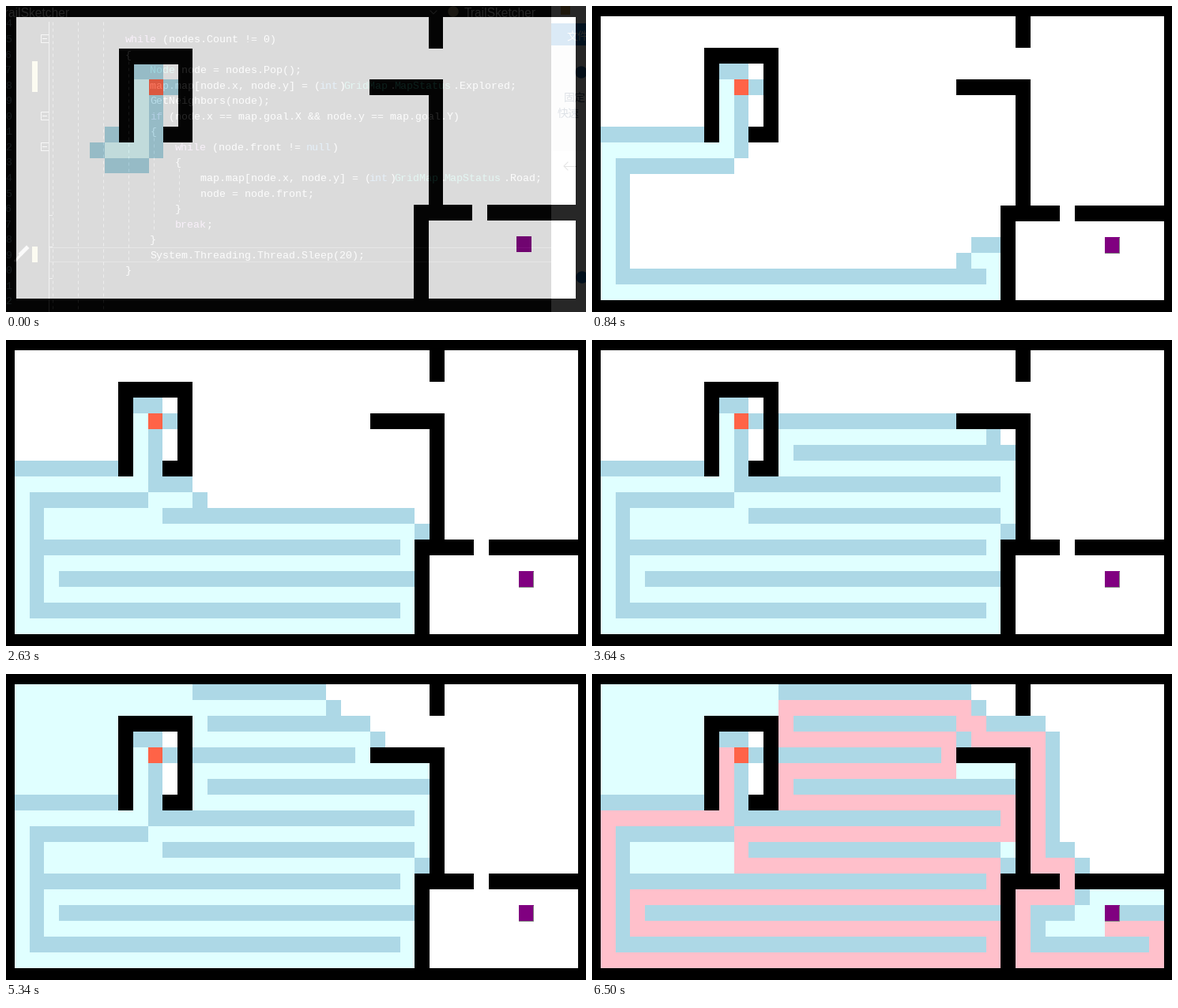
A matplotlib script that plays this animation: 734 px wide and 388 px high, repeating every 7980 ms.

```python
import numpy as np
import matplotlib.pyplot as plt
from matplotlib.animation import FuncAnimation
from matplotlib.patches import Circle, Rectangle

W, H, DPI = 734, 388, 100
LOOP, INTERVAL = 7980, 20
STEP_MS, LAST_STEP = 77.38, 84
PX = 72 / DPI

FREE, WALL, QUEUED, EXPLORED, ROAD, START, GOAL = range(7)
PALETTE = np.array([
    (255, 255, 255), (0, 0, 0), (173, 216, 230), (224, 255, 255),
    (255, 192, 203), (255, 99, 71), (128, 0, 128)], dtype=np.uint8)

# Grid positions are (row, column), counted with the outer wall.
START_AT, GOAL_AT = (5, 10), (15, 35)


def build_map():
    grid = np.full((20, 40), WALL)
    grid[1:19, 1:39] = FREE
    walls = [  # first row, last row, first column, last column
        (3, 8, 8, 8), (3, 3, 8, 12), (3, 8, 12, 12), (8, 8, 11, 12),
        (1, 2, 29, 29), (5, 5, 25, 29), (5, 13, 29, 29),
        (13, 13, 28, 31), (13, 13, 33, 38), (13, 18, 28, 28)]
    for r0, r1, c0, c1 in walls:
        grid[r0:r1 + 1, c0:c1 + 1] = WALL
    return grid


def search():
    """Depth-first search; one picture per popped node, then the road."""
    grid = build_map()
    front = {START_AT: None}
    stack = [START_AT]
    shots = []

    def shoot():
        shot = grid.copy()
        shot[START_AT], shot[GOAL_AT] = START, GOAL
        shots.append(PALETTE[shot])

    shoot()
    while stack:
        node = stack.pop()
        grid[node] = EXPLORED
        r, c = node
        for near in ((r - 1, c), (r, c + 1), (r + 1, c), (r, c - 1)):
            if grid[near] == FREE and near not in front:
                front[near] = node
                grid[near] = QUEUED
                stack.append(near)
        shoot()
        if node == GOAL_AT:
            break
    while front[node] is not None:
        grid[node] = ROAD
        node = front[node]
    shoot()
    return shots


SHOTS = search()
PACE = ([0, 11, 20, 33, 34, 47, 66, 69, 84],
        [8, 52, 85, 135, 138, 187, 260, 271, 327])

fig = plt.figure(figsize=(W / DPI, H / DPI), dpi=DPI, facecolor="#1e1e1e")
ax = fig.add_axes([0, 0, 1, 1])
ax.set_xlim(0, W)
ax.set_ylim(H, 0)
ax.axis("off")

desktop = []


def label(x, y, text, size, color, font="Liberation Mono", ha="left"):
    desktop.append(ax.text(x, y, text, fontsize=size * PX, color=color,
                           family=font, ha=ha, va="center_baseline"))


def line(xs, ys, color="#a5a5a5", width=1, style="-"):
    desktop.extend(ax.plot(xs, ys, color=color, lw=width * PX, ls=style))


def shape(patch):
    desktop.append(ax.add_patch(patch))


def box(x, y, w, h, color, fill=True):
    shape(Rectangle((x, y), w, h, fill=fill, fc=color,
                    ec="none" if fill else color, lw=PX))


CHAR, PITCH, TOP = 7.92, 19.55, 41.5
TINTS = {"while": "#d8a0df", "if": "#d8a0df", "break": "#d8a0df",
         "int": "#569cd6", "null": "#569cd6", "Node": "#4ec9b0",
         "GridMap": "#4ec9b0", "MapStatus": "#4ec9b0"}
CODE = [
    (0, "while (nodes.Count != 0)"),
    (0, "{"),
    (1, "Node node = nodes.Pop();"),
    (1, "map.map[node.x, node.y] = (int)GridMap.MapStatus.Explored;"),
    (1, "GetNeighbors(node);"),
    (1, "if (node.x == map.goal.X && node.y == map.goal.Y)"),
    (1, "{"),
    (2, "while (node.front != null)"),
    (2, "{"),
    (3, "map.map[node.x, node.y] = (int)GridMap.MapStatus.Road;"),
    (3, "node = node.front;"),
    (2, "}"),
    (2, "break;"),
    (1, "}"),
    (1, "System.Threading.Thread.Sleep(20);"),
    (0, "}"),
]


def draw_code():
    for i, (depth, text) in enumerate(CODE):
        x, y = 150.5 + depth * 4 * CHAR, TOP + i * PITCH
        for word, tint in TINTS.items():
            at = text.find(word)
            if at >= 0:
                label(x + at * CHAR, y, word, 13.2, tint)
                text = text.replace(word, " " * len(word), 1)
        lead = len(text) - len(text.lstrip())
        label(x + lead * CHAR, y, text.lstrip(), 13.2, "#f0f0f0")
    for i in range(-1, 18):
        label(-1, TOP + i * PITCH, str((i + 5) % 10), 13.2, "#8aa8b4")


def draw_editor():
    label(81, 8, "TrailSketcher", 15.5, "#f0f0f0", "Liberation Sans", "right")
    label(580, 8, "TrailSketcher", 15.5, "#f0f0f0", "Liberation Sans")
    shape(Circle((566, 7), 6, color="#b0a080"))
    line([537, 541, 545], [6, 10, 6], "#c0c0c0")
    line([53.5, 53.5], [20, H])
    for y in (265, 305, 345):
        line([53.5, 58], [y, y])
    for x, y0, y1 in ((59, 20, H), (91, 20, H), (123, 20, H),
                      (154.5, 70, 326), (186.5, 167, 287), (218.5, 206, 248)):
        line([x, x], [y0, y1], "#909090", 1, (0, (4, 4)))
    for y in (41, 139, 178):
        box(43.5, y - 5, 10, 10, "#1e1e1e")
        box(43.5, y - 5, 10, 10, "#d0d0d0", fill=False)
        line([46, 51], [y, y], "#e0e0e0")
    box(33, 70, 7, 39, "#efe9a8")
    box(33, 305, 7, 20, "#efe9a8")
    box(55, 305.5, 635, 18, "#606060", fill=False)
    line([12, 20], [323, 314], "#e0e0e0", 3)
    line([19, 26], [314, 307], "#e0e0e0", 5)


def draw_explorer():
    cjk = "Noto Sans CJK JP"
    box(690, 0, 44, H, "#ffffff")
    box(702, 0, 12, 11, "#c8a050")
    box(690, 22, 44, 28, "#1979ca")
    label(709, 37, "文件", 14, "#ffffff", cjk)
    box(690, 50, 44, 134, "#f5f6f7")
    shape(Circle((728, 84), 7, color="#2060a0"))
    label(706, 115, "固定", 14, "#304868", cjk)
    label(698, 135, "快速", 14, "#304868", cjk)
    line([706, 721], [203, 203], "#505050")
    line([711, 706, 711], [198, 203, 208], "#505050")
    shape(Circle((729, 344), 7, color="#0a64b8"))


draw_code()
draw_editor()
draw_explorer()


def extent(left, right, top, bottom):
    """Widen the box of the inner cells by one wall cell on each side."""
    dx, dy = (right - left) / 38, (bottom - top) / 18
    return left - dx, right + dx, bottom + dy, top - dy


OPENING = extent(13, 720.8, 14, 371.3)
SETTLED = extent(10.9, 723.9, 13, 373.5)

stage = ax.imshow(SHOTS[0], extent=SETTLED, interpolation="nearest",
                  aspect="auto", zorder=10)
edge, = ax.plot([667, 667, 649], [294, 313, 313], color="#808080",
                lw=PX, zorder=11)
ax.set_xlim(0, W)
ax.set_ylim(H, 0)


def update(i):
    t = (i + 0.5) * INTERVAL
    step = min(int((t + 15) / STEP_MS), LAST_STEP)
    pops = int(round(np.interp(step, *PACE)))
    opening = step == 0
    stage.set_data(SHOTS[-1] if step == LAST_STEP else SHOTS[pops])
    stage.set_extent(OPENING if opening else SETTLED)
    ax.set_xlim(0, W)
    ax.set_ylim(H, 0)
    stage.set_alpha(0.85 if opening else 1)
    edge.set_visible(not opening)
    for item in desktop:
        item.set_visible(opening)
    return [stage, edge]


anim = FuncAnimation(fig, update, frames=LOOP // INTERVAL, interval=INTERVAL,
                     init_func=lambda: update(0), repeat=True, repeat_delay=0)
plt.show()
```
